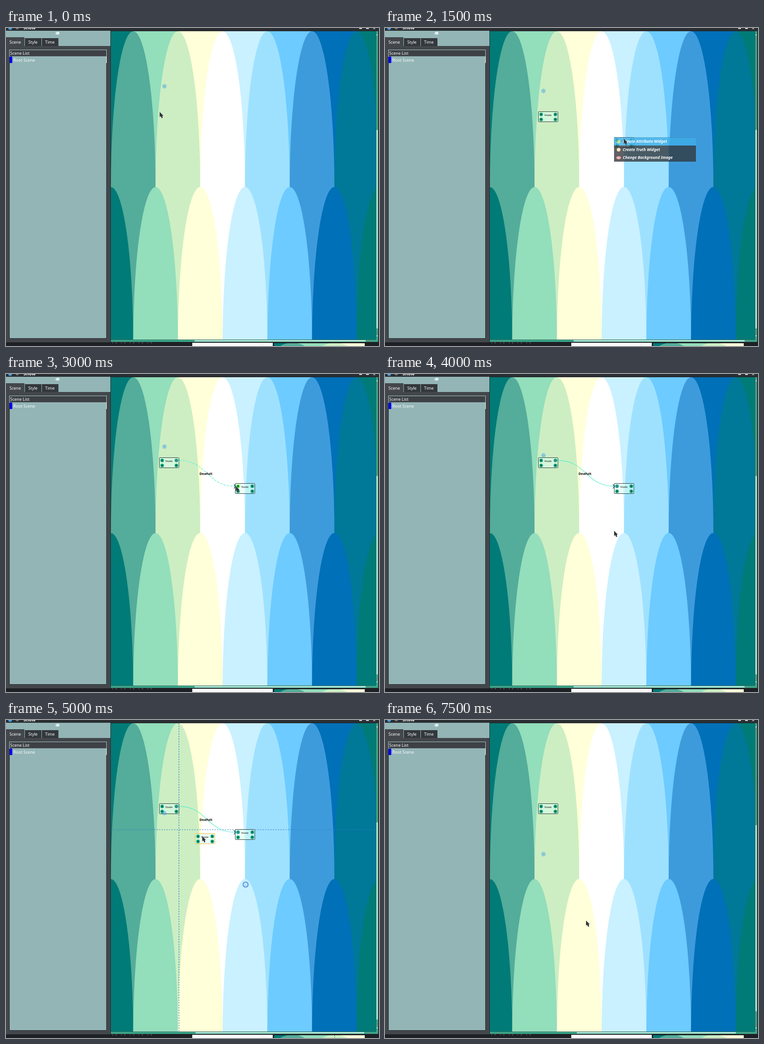
These frames come from a looping animation (811 px wide and 690 px high, 8000 ms). An HTML page:

```html
<!DOCTYPE html>
<html lang="en">
<head>
<meta charset="utf-8">
<title>Node editor</title>
<style>
html, body { margin: 0; width: 100%; height: 100%; overflow: hidden; background: #2a2e32; }
svg { display: block; width: 811px; height: 690px; }
text { font-family: "Noto Sans", "Open Sans", sans-serif; font-size: 9px; fill: #fcfcfc; white-space: pre; }
.node { font-size: 6px; fill: #111; }
.label { font-size: 7.5px; font-weight: 700; fill: #000; }
.item { font-size: 8.5px; font-weight: 700; font-style: italic; }
</style>
</head>
<body>
<svg id="stage" viewBox="0 0 811 690" xmlns="http://www.w3.org/2000/svg">
  <defs>
    <clipPath id="view"><rect x="228" y="7" width="576" height="669"/></clipPath>
    <clipPath id="mini"><rect x="583" y="684" width="197" height="6"/></clipPath>
  </defs>
  <g id="fixed"></g>
  <g id="moving"></g>
</svg>
<script>
const STEP = 500, LOOP = 8000;
const EVEN = ['#007b77', '#93debb', '#ffffd9', '#caf1ff', '#6dcbff', '#0070b8'];
const ODD = ['#54ac9a', '#cdeec3', '#ffffff', '#9ee1ff', '#3e9bdb', '#007898'];

const rect = (x, y, w, h, fill, more = '') =>
  `<rect x="${x}" y="${y}" width="${w}" height="${h}" fill="${fill}" ${more}/>`;
const disc = (x, y, r, fill, more = '') =>
  `<circle cx="${x}" cy="${y}" r="${r}" fill="${fill}" ${more}/>`;
const text = (x, y, str, more = '') => `<text x="${x}" y="${y}" ${more}>${str}</text>`;
const line = (x1, y1, x2, y2, stroke, more = '') =>
  `<line x1="${x1}" y1="${y1}" x2="${x2}" y2="${y2}" stroke="${stroke}" ${more}/>`;

// One row of tall scales: half an ellipse standing on a straight column.
function scales(left, top, pitch, rise, colors, count) {
  let out = '';
  for (let i = 0; i < count; i++) {
    const x = left + i * pitch, r = pitch / 2;
    out += `<path fill="${colors[i % colors.length]}" d="M${x - r},${top + rise}` +
      `a${r},${rise} 0 0 1 ${pitch},0v700h${-pitch}z"/>`;
  }
  return out;
}

function backdrop() {
  const pitch = 97.2, rise = 338;
  return `<g clip-path="url(#view)">` +
    scales(228, -331, pitch, rise, EVEN, 7) +
    scales(276.6, 7, pitch, rise, ODD, 6) +
    scales(228, 345, pitch, rise, EVEN, 7) + '</g>';
}

function sidePanel() {
  return rect(0, 6, 227, 33, '#93b5b6') +
    `<ellipse cx="112" cy="11.5" rx="4.5" ry="3" fill="#d5e6ea"/>` +
    disc(113, 10, 2, '#f4fafa') +
    rect(0, 39, 227, 643, '#43474c') +
    rect(0, 20, 40, 20, '#43474c') +
    rect(41, 22, 36, 17, '#33383d') +
    rect(78, 22, 36, 17, '#33383d') +
    text(7.5, 33.5, 'Scene') + text(48.5, 34, 'Style') + text(85, 34, 'Time') +
    rect(7.5, 47.5, 211, 626, '#93b5b6', 'stroke="#272b2f"') +
    rect(7.5, 47.5, 211, 14.5, '#3d4146', 'stroke="#a9c9ca"') +
    text(9, 58, 'Scene List') +
    rect(8, 62, 5.5, 14, '#0000ff') +
    text(16, 72.5, 'Root Scene') +
    line(218.5, 62, 218.5, 76, '#f0f8f8');
}

function frameBars() {
  return rect(0, 0, 811, 6, '#2a2e32') +
    disc(9, 0, 4, '#4a9fe0') + disc(24.5, -1, 3, 'none', 'stroke="#ddd"') +
    text(38, 2.5, 'Show', 'style="font-size:10px;font-weight:700"') +
    rect(768, 0, 6, 2, '#ddd') + rect(783, 0, 6, 2, '#ddd') +
    line(798, 2.5, 803, -1, '#ddd') + line(803, 2.5, 798, -1, '#ddd') +
    rect(227, 6, 1, 676, '#24282c') + rect(228, 6, 576, 1, '#24282c');
}

function lowerEdge() {
  return rect(0, 682, 811, 8, '#1d2125') +
    line(231, 683, 320, 683, '#9aa', 'stroke-dasharray="2 5 3 9" stroke-width=".8"') +
    rect(405, 683, 175, 7, '#fafafa') + rect(557, 684, 1, 6, '#e4e4e4') +
    `<g clip-path="url(#mini)">` + rect(583, 684, 197, 6, '#007b77') +
    rect(623, 684, 92, 6, '#93debb') + rect(715, 684, 65, 6, '#ffffd9') +
    `<ellipse cx="623" cy="720" rx="46" ry="37" fill="#54ac9a"/>` +
    `<ellipse cx="715" cy="720" rx="46" ry="37" fill="#cdeec3"/></g>`;
}

function scrollbars([top, bottom, left, right]) {
  return rect(804, 7, 5, 674, '#3aa88a') + rect(228, 676.5, 576, 4.5, '#3aa88a') +
    rect(805.5, top, 3, bottom - top, '#b9eee0', 'rx="1"') +
    rect(left, 677.3, right - left, 3, '#b9eee0', 'rx="1"') +
    rect(804, 7, 1, 669, '#2f5f5a') +
    rect(806, 14, 2, 2, '#e6f7f2') + rect(806, 667, 2, 2, '#e6f7f2') +
    rect(805, 21, 4, 1, '#b86b6b') + rect(805, 661, 4, 1, '#b86b6b') +
    rect(243, 677, 1, 4, '#b86b6b') + rect(788, 677, 1, 4, '#b86b6b');
}

// Each node is [x, y, {options}]; linked and hot name a port by index.
function node([x, y, { border = '#2f3a3a', linked, hot } = {}]) {
  const ports = [[6, 6], [37, 6], [6, 17], [37, 17]].map(([dx, dy], i) =>
    disc(x + dx, y + dy, 4, i === hot ? '#7dff2c' : '#2db88d') +
    disc(x + dx, y + dy, 2.5, i === linked ? '#2b7590' : '#08755f') +
    (i === linked ? disc(x + dx, y + dy, 1, '#58b9a8') : ''));
  return rect(x, y, 42.5, 22, 'rgba(220,255,238,.55)', `rx="1.5" stroke="${border}"`) +
    text(x + 21, y + 9.5, 'Node', 'class="node" text-anchor="middle"') + ports.join('');
}

function edge([a, b, dashed]) {
  const x1 = a[0] + 43, y1 = a[1] + 6, x2 = b[0] - 1, y2 = b[1] + 6;
  const mid = (x1 + x2) / 2;
  return `<path d="M${x1},${y1}C${mid},${y1} ${mid},${y2} ${x2},${y2}" fill="none" ` +
    `stroke="#67efce" stroke-width="1.3" ${dashed ? 'stroke-dasharray="5 2.5"' : ''}/>` +
    `<path d="M${x2 - 3},${y2 - 5}L${x2 + 5},${y2}L${x2 - 3},${y2 + 6}L${x2},${y2 + .5}Z" fill="#1f6f8e"/>` +
    text(mid - 2.3, (y1 + y2) / 2 + 3, 'Deafult', 'class="label" text-anchor="middle"');
}

function menu([x, y, opacity]) {
  const items = ['Create Attribute Widget', 'Create Truth Widget', 'Change Background Image'];
  return `<g opacity="${opacity}">` + rect(x, y, 178, 52.5, '#31363b') +
    rect(x, y, 178, 17.5, '#3daee9') +
    disc(x + 10, y + 9, 4, '#b5e08a') + disc(x + 10, y + 26.5, 4, '#f3d9b1') +
    `<ellipse cx="${x + 10}" cy="${y + 44}" rx="5" ry="3.3" fill="#f59a9a"/>` + '</g>' +
    items.map((s, i) => text(x + 19, y + 11.7 + i * 17.6, s, 'class="item"')).join('');
}

function guides([x, y]) {
  const dash = 'stroke-dasharray="3 2.5" stroke-width="1.2"';
  return line(x, 7, x, 676, '#2f80c8', dash) + line(228, y, 804, y, '#2f80c8', dash);
}

const cursor = ([x, y]) =>
  `<path transform="translate(${x},${y})" fill="#31363b" stroke="#fff" stroke-opacity=".25" stroke-width=".6" ` +
  `d="M0,0V11.3L2.6,9.6L4.4,13.8L7,12.8L5.9,9L8,8Z"/>`;

function flake(y) {
  let out = `<g transform="translate(344.5,${y})" stroke-width="1.1">`;
  for (let i = 0; i < 8; i++)
    out += `<path d="M0,-1.7V-5" stroke="#1d8ff0" stroke-dasharray="1.5 .5" transform="rotate(${i * 45})"/>`;
  return out + disc(0, 0, .8, '#1d8ff0') + '</g>';
}

const A = [333.5, 181.5], B = [498.5, 237.5], C = [407.8, 202];
const YELLOW = '#f0b83a';
const bars = { wide: [221, 652, 410, 782], mid: [222, 650, 412, 779], tight: [228, 632, 417, 763] };
const linkedA = [...A, { linked: 1 }], linkedB = [...B, { linked: 0 }];

const fall = [126.5, 128, 132, 136.5, 143, 149, 157.5, 166, 176.5, 188.5, 202, 216, 232.5, 250.5, 270, 291];
const joined = { nodes: [linkedA, linkedB], edges: [[A, B]] };
const rest = { bars: bars.tight, cursor: [437, 435] };

const scenes = [
  { cursor: [334, 182] },
  { cursor: [334, 182] },
  { nodes: [[...A, { border: YELLOW }]], cursor: [502, 238] },
  { nodes: [A, B], menu: [498, 237.5, .78], cursor: [519, 240] },
  { nodes: [A, B], cursor: [602, 672] },
  { nodes: [A, B], cursor: [603, 677] },
  { nodes: [linkedA, [...B, { hot: 0 }]], edges: [[A, B, true]], cursor: [499.5, 243] },
  { nodes: [linkedA, [...B, { linked: 0, border: YELLOW }]], edges: [[A, B]], cursor: [520, 244] },
  { ...joined, cursor: [498, 340] },
  { ...joined, menu: [498, 341, .92], cursor: [521, 355] },
  { nodes: [linkedA, linkedB, [411.5, 246.5, { border: YELLOW }]], edges: [[A, B]],
    guides: [376, 238], mini: true, ring: [521, 357], cursor: [426.5, 252], bars: bars.mid },
  { nodes: [linkedA, linkedB, [423.5, 220.5, { border: YELLOW }]], edges: [[A, B]],
    guides: [498, 238], cursor: [438.5, 226], bars: bars.tight },
  { ...rest, nodes: [linkedA, C, linkedB], edges: [[A, C], [C, B]], spot: [437, 436] },
  { ...rest, nodes: [linkedA, C, linkedB] },
  { ...rest, nodes: [linkedA, linkedB] },
  { ...rest, nodes: [A] }
];

function draw(i) {
  const s = scenes[i];
  return scrollbars(s.bars || bars.wide) +
    (s.guides ? guides(s.guides) : '') +
    (s.mini ? line(714.5, 684, 714.5, 690, '#2f6f68', 'stroke-dasharray="2 2"') : '') +
    (s.edges || []).map(edge).join('') +
    (s.nodes || []).map(node).join('') +
    flake(fall[i]) +
    (s.menu ? menu(s.menu) : '') +
    (s.ring ? disc(...s.ring, 5.5, 'rgba(90,150,225,.12)', 'stroke="#5b97e2" stroke-width="2.2"') : '') +
    (s.spot ? disc(...s.spot, 6.8, '#4a8fe0') : '') +
    cursor(s.cursor);
}

document.getElementById('fixed').innerHTML =
  backdrop() + sidePanel() + frameBars() + lowerEdge();

const moving = document.getElementById('moving');
let shown = -1;
function tick() {
  const i = Math.floor(performance.now() % LOOP / STEP);
  if (i !== shown) moving.innerHTML = draw(shown = i);
  requestAnimationFrame(tick);
}
tick();
</script>
</body>
</html>
```
